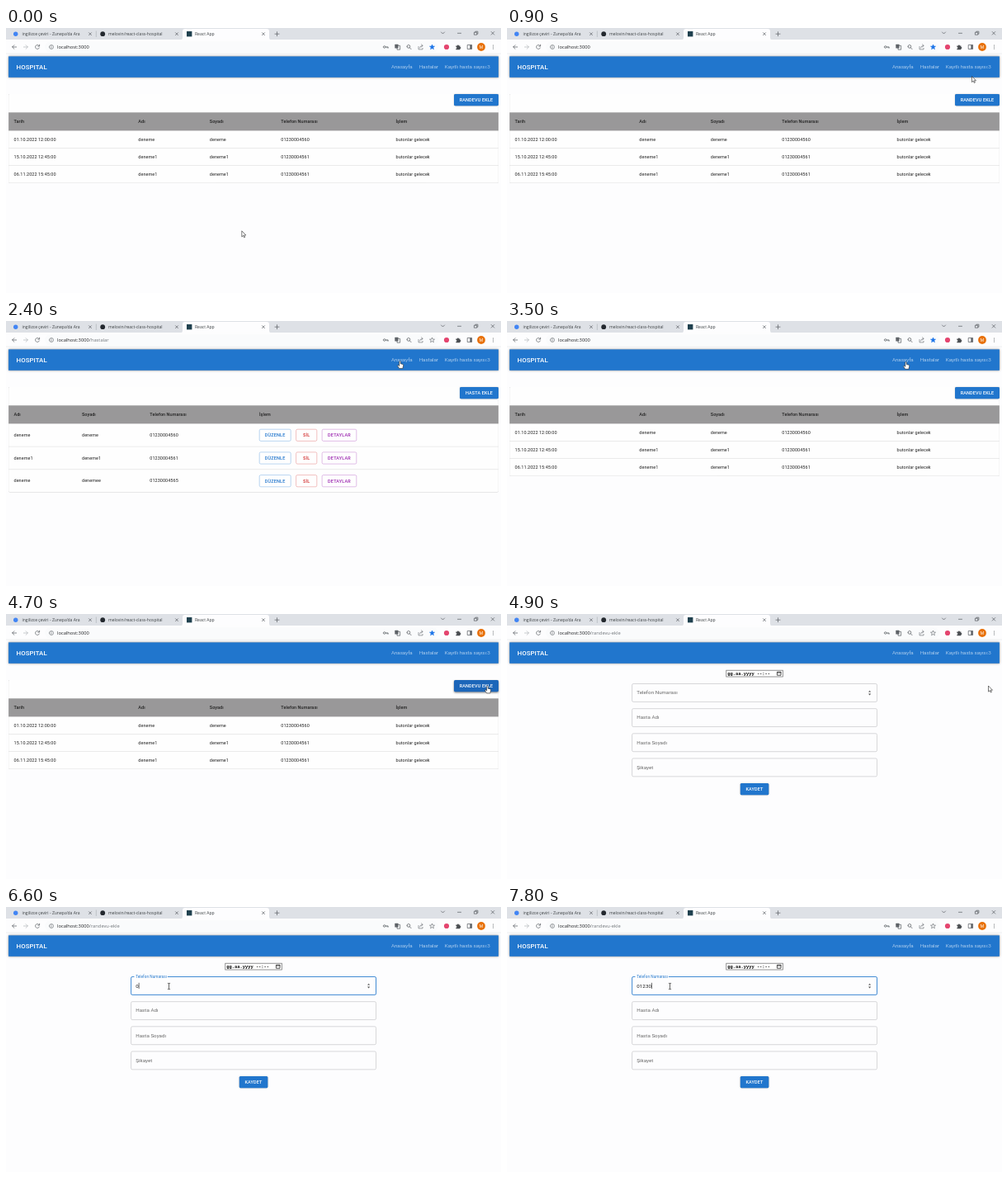
Recreate the animation shown at these times as an HTML page. Size 600 by 321 pixels, loop 8 s.

```html
<!DOCTYPE html>
<html lang="tr">
<head>
<meta charset="utf-8">
<title>Hospital</title>
<style>
html, body { margin: 0; width: 100%; height: 100%; overflow: hidden; background: #fdfdfe; }
svg { display: block; width: 600px; height: 321px; }
text { font-family: Roboto, Arial, sans-serif; white-space: pre; }
.ui { font-family: "Open Sans", "Noto Sans", sans-serif; }
.line { fill: none; stroke: #5f6368; stroke-width: .75; stroke-linecap: round; stroke-linejoin: round; }
.bar { filter: drop-shadow(0 .9px .9px rgba(0,0,0,.3)) drop-shadow(0 .4px 1.6px rgba(0,0,0,.2)); }
.paper { filter: drop-shadow(0 .6px .5px rgba(0,0,0,.35)); }
.btn { filter: drop-shadow(0 .6px .7px rgba(0,0,0,.35)) drop-shadow(0 .2px .8px rgba(0,0,0,.15)); }
.btn.hover { filter: drop-shadow(0 1.2px 1.3px rgba(0,0,0,.5)); }
.btn.hover rect { fill: #1c66b9; }
</style>
</head>
<body>
<svg id="stage" viewBox="0 0 600 321" xmlns="http://www.w3.org/2000/svg"></svg>
<script>
const BLUE = '#2176cd', INK = '#222', EDGE = '#c8c8ca', LOOP = 8000, TICK = 100;

// ---- drawing helpers; text is placed by its vertical middle ----
const attrs = o => Object.entries(o).map(([k, v]) => ` ${k}="${v}"`).join('');
const text = (x, mid, size, str, o = {}) =>
  `<text x="${x}" y="${mid + size * .36}" font-size="${size}"${attrs({ fill: INK, ...o })}>${str}</text>`;
const rect = (x, y, w, h, fill, o = {}) =>
  `<rect x="${x}" y="${y}" width="${w}" height="${h}" fill="${fill}"${attrs(o)}/>`;
const dot = (x, y, r, fill) => `<circle cx="${x}" cy="${y}" r="${r}" fill="${fill}"/>`;
const line = (d, o = {}) => `<path class="line" d="${d}"${attrs(o)}/>`;
const group = (id, body) => `<g id="${id}">${body}</g>`;
const ui = (x, mid, size, str, fill = '#3c4043') => text(x, mid, size, str, { class: 'ui', fill });
const cross = (x, y, r) => line(`M${x - r} ${y - r}l${2 * r} ${2 * r}m0 ${-2 * r}l${-2 * r} ${2 * r}`);

const caps = (x, mid, str, fill) => text(x, mid, 5.47, str,
  { fill, 'font-weight': 500, 'letter-spacing': .17, 'text-anchor': 'middle' });
const button = (id, x, y, w, str) =>
  `<g id="${id}" class="btn">${rect(x, y, w, 14.3, BLUE, { rx: 1.6 })}${caps(x + w / 2, y + 7.1, str, '#fff')}</g>`;
const outlined = (x, mid, w, str, color, edge) =>
  rect(x, mid - 7, w, 14.2, 'none', { rx: 1.6, stroke: edge, 'stroke-width': .6 }) + caps(x + w / 2, mid, str, color);
const cell = (x, mid, str, weight = 400) =>
  text(x, mid, 5.47, str, { 'font-weight': weight, 'letter-spacing': .06 });

// ---- browser frame ----
function starPath(x, y, r) {
  const pts = Array.from({ length: 10 }, (_, i) => {
    const a = i * Math.PI / 5 - Math.PI / 2, q = i % 2 ? r * .42 : r;
    return (x + q * Math.cos(a)).toFixed(2) + ' ' + (y + q * Math.sin(a)).toFixed(2);
  });
  return 'M' + pts.join('L') + 'Z';
}

const chrome = () =>
  rect(0, 0, 600, 14.5, '#dee1e6') +
  rect(0, 14, 600, 17, '#fdfdfe') +
  `<path d="M211 14.5Q214 14.5 214 11.5V4Q214 1 217 1H316Q319 1 319 4V11.5Q319 14.5 322 14.5Z" fill="#fdfdfe"/>` +
  dot(11.7, 7.2, 2.7, '#4285f4') + ui(19.5, 7.2, 5.05, "ingilizce çeviri - Zunepa'da Ara") +
  dot(117.2, 7.2, 2.9, '#24292f') + ui(124, 7.2, 5.05, 'melovin/react-class-hospital') +
  rect(219, 4, 6.4, 6.4, '#20414f') + ui(229, 7.2, 5.05, 'React App') +
  [102, 207, 312].map(x => cross(x, 7.2, 1.5)).join('') +
  line('M109.3 4V10.5', { style: 'stroke:#9aa0a6;stroke-width:.5' }) +
  line('M326 7.2h5m-2.5 -2.5v5') +
  line('M527.5 5l2 2l2 -2') + line('M547.5 6.3h4') +
  line('M567.8 5.2h3v3h-3zM568.9 5.2v-1h3v3h-1') + cross(590, 6.3, 1.8) +
  // toolbar
  line('M12.6 23h-5m2.3 -2.3l-2.3 2.3l2.3 2.3') +
  line('M21.4 23h5m-2.3 -2.3l2.3 2.3l-2.3 2.3', { style: 'stroke:#b5b8bc' }) +
  line('M40.2 21.6A2.5 2.5 0 1 0 40.4 24M40.6 20.2v1.9h-1.9') +
  rect(47, 16.6, 477, 12.8, '#fafbfc', { rx: 6.4 }) +
  line('M52.5 23a2.5 2.5 0 1 0 5 0a2.5 2.5 0 1 0 -5 0M55 22.8v1.4M55 21.6v.1', { style: 'stroke-width:.6' }) +
  `<text class="ui" x="62" y="25" font-size="5.75" fill="#202124">localhost:3000<tspan id="path" fill="#70757a"></tspan></text>` +
  line('M457.4 23a1.3 1.3 0 1 0 2.6 0a1.3 1.3 0 1 0 -2.6 0M460 23h3.2v1.2m-1.2 -1.2v1') +
  rect(471.3, 19.8, 4.2, 4.6, '#5f6368', { rx: .5 }) +
  line('M475.6 21.4h2v4.8h-3.6v-1.8') +
  line('M486 22.4a1.9 1.9 0 1 0 3.8 0a1.9 1.9 0 1 0 -3.8 0M489.3 23.8l1.8 1.9') +
  line('M500 22.5v3.4h5v-1.5M501.5 24q.3 -2.6 3.4 -2.6m-1.4 -1.5l1.7 1.5l-1.7 1.5', { style: 'stroke-width:.6' }) +
  `<path id="star" d="${starPath(516.5, 23.2, 3.2)}" stroke-width=".6"/>` +
  dot(534, 23, 3.1, '#e4456f') +
  `<path d="M545.4 21.4h1.5a1 1 0 1 1 2 0h1.5v1.5a1 1 0 1 1 0 2v1.4h-5v-1.4a1 1 0 1 0 0 -2z" fill="#4a4d51"/>` +
  line('M559.6 20.5h5v5h-5z') + rect(562.3, 20.5, 2.3, 5, '#5f6368') +
  dot(576, 23, 4.9, '#e8710a') +
  text(576, 23, 5, 'M', { fill: '#fff', 'text-anchor': 'middle' }) +
  [21, 23, 25].map(y => dot(590.5, y, .55, '#5f6368')).join('') +
  rect(0, 30.8, 600, .5, '#dcdee2');

// ---- pages ----
const navLink = (x, str) => text(x, 47.2, 6.25, str, { fill: '#eaf3fc', 'font-weight': 300 });
const nav = () =>
  rect(3.1, 34.4, 593.8, 25.4, BLUE, { class: 'bar' }) +
  text(12.6, 47, 7.85, 'HOSPITAL', { fill: '#fff', 'font-weight': 500, 'letter-spacing': .06 }) +
  navLink(467, 'Anasayfa') + navLink(500.7, 'Hastalar') + navLink(531.7, 'Kayıtlı hasta sayısı:3');

function table(cols, head, rows, rowHeight) {
  const bottom = 124.4 + rowHeight * rows.length;
  let out = rect(3.1, 80, 593.8, bottom - 80, '#fefefe', { class: 'paper', rx: 1.4 }) +
    rect(3.1, 102.3, 593.8, 22.1, '#999899');
  head.forEach((s, i) => out += cell(cols[i], 113.2, s, 500));
  rows.forEach((row, r) => {
    const top = 124.4 + rowHeight * r;
    row.forEach((s, i) => out += cell(cols[i], top + rowHeight / 2 - .3, s));
    if (r) out += rect(3.1, top - .3, 593.8, .6, '#dedede');
  });
  return out;
}

const home = () =>
  table([9.5, 160.3, 246.8, 333.3, 472.5],
    ['Tarih', 'Adı', 'Soyadı', 'Telefon Numarası', 'İşlem'],
    [['01.10.2022 12:00:00', 'deneme', 'deneme', '01230004560', 'butonlar gelecek'],
     ['15.10.2022 12:45:00', 'deneme1', 'deneme1', '01230004561', 'butonlar gelecek'],
     ['06.11.2022 15:45:00', 'deneme1', 'deneme1', '01230004561', 'butonlar gelecek']], 21.1) +
  button('addVisit', 543, 79.9, 54, 'RANDEVU EKLE');

const patients = () =>
  table([9.5, 92, 174.3, 307],
    ['Adı', 'Soyadı', 'Telefon Numarası', 'İşlem'],
    [['deneme', 'deneme', '01230004560'],
     ['deneme1', 'deneme1', '01230004561'],
     ['deneme', 'denemee', '01230004565']], 27.7) +
  [138.2, 165.9, 193.6].map(y =>
    outlined(307.2, y, 38, 'DÜZENLE', BLUE, '#8cbae8') +
    outlined(351.6, y, 25.2, 'SİL', '#d32f2f', '#e99797') +
    outlined(383.1, y, 41.7, 'DETAYLAR', '#9c27b0', '#cd93d7')).join('') +
  button('addPatient', 550, 79.9, 47, 'HASTA EKLE');

const field = (id, y, label) =>
  rect(151.6, y, 296.9, 21.9, 'none', { id: id + 'Box', rx: 1.6, stroke: EDGE, 'stroke-width': .7 }) +
  rect(155.4, y - 1, 40.5, 2, '#fdfdfe', { id: id + 'Notch', display: 'none' }) +
  `<text id="${id}Label" font-size="6.2" letter-spacing=".05" x="157.2" y="${y + 12.8}" fill="#666">${label}</text>`;

const form = () =>
  rect(265.8, 68.2, 68.5, 7.8, '#fff', { stroke: '#666', 'stroke-width': .7 }) +
  `<text x="267.3" y="73.9" font-size="5.4" font-weight="700" style="font-family:'Liberation Mono',monospace">gg.aa.yyyy --:--</text>` +
  line('M327.8 70.2h4.2v4h-4.2zM327.8 71h4.2', { style: 'stroke:#222' }) +
  ['Telefon Numarası', 'Hasta Adı', 'Hasta Soyadı', 'Şikayet']
    .map((s, i) => field('f' + i, 84.5 + 30.15 * i, s)).join('') +
  `<path d="M438 94.6l1.6 -1.9l1.6 1.9zM438 96.6l1.6 1.9l1.6 -1.9z" fill="#555"/>` +
  text(157.2, 95.3, 6.25, '', { id: 'typed', 'letter-spacing': .06 }) +
  rect(157, 91.8, .6, 7.2, '#111', { id: 'caret' }) +
  button('save', 282.8, 205, 34.5, 'KAYDET');

const pointers =
  group('arrow', `<path d="M0 0V7.1L1.7 5.6L2.8 8L3.9 7.5L2.8 5.2H5Z" fill="#fff" stroke="#222" stroke-width=".6"/>`) +
  group('hand', `<path d="M-.8 .6Q0 -.6 .8 .6V3.2L3.6 3.9Q4.4 4.2 4.2 5.4L3.4 8.9H-.9L-2.9 5.8Q-3 4.7 -1.9 5L-.8 5.9Z" fill="#fff" stroke="#222" stroke-width=".6"/>`) +
  group('beam', `<path d="M-1.5 -3.6H-.4L0 -3.2L.4 -3.6H1.5M0 -3.2V3.2M-1.5 3.6H-.4L0 3.2L.4 3.6H1.5" fill="none" stroke="#222" stroke-width=".7"/>`);

document.getElementById('stage').innerHTML =
  rect(0, 0, 600, 321, '#fdfdfe') + group('nav', nav()) +
  group('home', home()) + group('patients', patients()) + group('form', form()) +
  group('loading', `<text x="3.1" y="51.2" font-size="12.5" font-weight="700" fill="#000" style="font-family:'Liberation Serif',serif">Loading...</text>`) +
  chrome() + group('pointer', pointers);

// ---- timeline ----
const pages = [ // start, page, path
  [0, 'home', ''], [1900, 'loading', '/hastalar'], [2100, 'patients', '/hastalar'],
  [3200, 'loading', ''], [3400, 'home', ''], [4900, 'form', '/randevu-ekle']
];
const moves = [ // time, x, y of the pointer tip
  [0, 285.8, 245.8], [200, 290, 238], [300, 290, 238],
  [900, 563.5, 58.5], [1200, 562, 50], [1700, 511, 46.3], [2000, 506.5, 46.5],
  [2400, 477.5, 48.5], [3400, 480, 48], [4300, 583.5, 87],
  [4900, 583.5, 87], [5600, 193.5, 91.5], [5700, 193.5, 91.5], [6000, 197.5, 96]
];
const keys = [6600, 6900, 7100, 7400, 7800];
const NUMBER = '01230', BEAM = 5800, FOCUS = 6000, FLOAT = 200;

const $ = id => document.getElementById(id);
const show = (id, on) => $(id).setAttribute('display', on ? 'inline' : 'none');
const set = (id, o) => { for (const k in o) $(id).setAttribute(k, o[k]); };
const mix = (a, b, p) => a + (b - a) * p;
const clamp = p => Math.max(0, Math.min(1, p));
const ease = p => p * p * (3 - 2 * p);

function pointerAt(t) {
  const i = moves.findIndex(m => m[0] > t);
  if (i < 0) return moves[moves.length - 1].slice(1);
  const [a, b] = [moves[i - 1], moves[i]], p = ease((t - a[0]) / (b[0] - a[0]));
  return [mix(a[1], b[1], p), mix(a[2], b[2], p)];
}

function draw(t) {
  const [, page, path] = pages.filter(p => p[0] <= t).pop();
  ['home', 'patients', 'form', 'loading'].forEach(id => show(id, id === page));
  show('nav', page !== 'loading');
  $('path').textContent = path;
  set('star', path ? { fill: 'none', stroke: '#5f6368' } : { fill: '#1a73e8', stroke: '#1a73e8' });

  const [x, y] = pointerAt(t);
  const inside = (l, top, r, b) => x >= l && x <= r && y >= top && y <= b;
  const onLink = page !== 'loading' && (inside(466, 42, 494, 52) || inside(500, 42, 525, 52));
  const onButton = page === 'home' && inside(543, 80, 597, 94);
  const shape = t >= BEAM ? 'beam' : onLink || onButton ? 'hand' : 'arrow';
  ['arrow', 'hand', 'beam'].forEach(id => show(id, id === shape));
  set('pointer', { transform: `translate(${x.toFixed(2)} ${y.toFixed(2)})` });
  $('addVisit').classList.toggle('hover', onButton);

  // phone field: hover, floating label, typing
  const focused = t >= FOCUS, hover = page === 'form' && inside(152, 84, 448, 107);
  const p = ease(clamp((t - FOCUS) / FLOAT));
  set('f0Box', {
    stroke: focused ? BLUE : hover ? '#333' : EDGE,
    'stroke-width': focused ? .85 : .7
  });
  set('f0Label', {
    'font-size': mix(6.2, 4.69, p), 'letter-spacing': mix(.05, .045, p),
    y: mix(97.3, 85.6, p), fill: focused ? BLUE : '#666'
  });
  show('f0Notch', focused);
  $('typed').textContent = NUMBER.slice(0, keys.filter(k => k <= t).length);
  show('caret', focused);
  set('caret', { x: 157.2 + $('typed').getComputedTextLength() });
}

const start = performance.now();
function frame() {
  const t = (performance.now() - start) % LOOP;
  draw(Math.floor(t / TICK) * TICK);
  requestAnimationFrame(frame);
}
frame();
</script>
</body>
</html>
```
